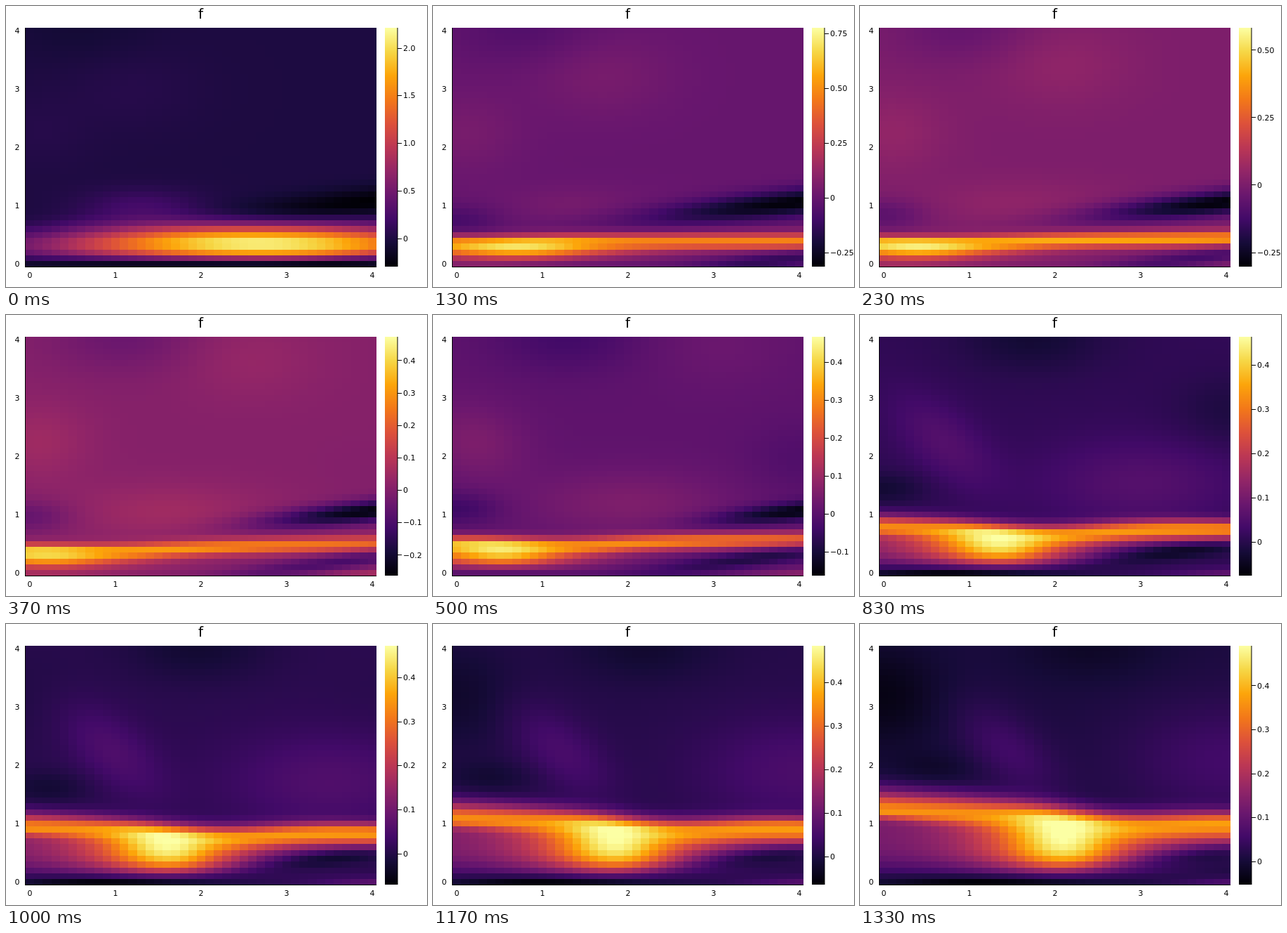
An HTML page with a canvas that plays this animation: 600 px wide and 400 px high, repeating every 1360 ms.

```html
<!DOCTYPE html>
<html lang="en">
<head>
<meta charset="utf-8">
<title>f</title>
<style>
html, body { margin: 0; width: 100%; height: 100%; overflow: hidden; background: #fff; }
canvas { display: block; }
</style>
</head>
<body>
<canvas id="plot" width="600" height="400"></canvas>
<script>
const ctx = document.getElementById('plot').getContext('2d');
const LOOP = 1360, N = 41;
const LEFT = 28, WIDTH = 500, BOTTOM = 371.5, HEIGHT = 340.5;
const BAR = { x: 540, y: 31, w: 18, h: 340 };

// Key points in time for the colour limits and the jet
const steps = [0, 4, 11, 18, 25, 35, 40];
const keys = {
  low: [-.293, -.314, -.263, -.1007, -.0754, -.0646, -.052],
  high: [2.214, .776, .4736, .465, .4634, .4849, .491],
  crestX: [2.7, .7, .25, .85, 1.35, 1.85, 2.1],
  base: [.1, .5, .36, .33, .32, .34, .35],
  crest: [2.1, .27, .11, .14, .14, .14, .14],
  floor: [-.15, .09, .06, -.045, -.07, -.065, -.055]
};

const palette = ['000004', '160b39', '420a68', '6a176e', '932667', 'bc3754',
  'dd513a', 'f37819', 'fca50a', 'f6d746', 'fcffa4']
  .map(hex => [0, 2, 4].map(i => parseInt(hex.slice(i, i + 2), 16)));

function colour(t) {
  const s = Math.min(1, Math.max(0, t)) * 10;
  const i = Math.min(9, Math.floor(s));
  const rgb = palette[i].map((c, n) => Math.round(c + (palette[i + 1][n] - c) * (s - i)));
  return `rgb(${rgb})`;
}

// Monotone cubic through the key points
function ease(ys, s) {
  const last = steps.length - 2;
  let i = 0;
  while (i < last && s >= steps[i + 1]) i++;
  const rise = n => (ys[n + 1] - ys[n]) / (steps[n + 1] - steps[n]);
  const slope = n => {
    if (n === 0) return rise(0);
    if (n > last) return rise(last);
    const a = rise(n - 1), b = rise(n);
    return a * b > 0 ? 2 * a * b / (a + b) : 0;
  };
  const h = steps[i + 1] - steps[i], u = (s - steps[i]) / h, v = 1 - u;
  return v * v * (1 + 2 * u) * ys[i] + u * u * (3 - 2 * u) * ys[i + 1]
    + h * u * v * (v * slope(i) - u * slope(i + 1));
}

const bell = (d, width) => Math.exp(-((d / width) ** 2));

function ramp(from, to, s) {
  const u = Math.min(1, Math.max(0, (s - from) / (to - from)));
  return u * u * (3 - 2 * u);
}

// Bright jet: a thin ridge with a filled crest travelling along it
function makeJet(s, key) {
  const burst = Math.exp(-s / 2);
  const growth = .00014 * s * s;
  const inletY = .37 + .029 * Math.max(0, s - 11);
  const outletY = .31 + .0175 * s;
  const dip = .05 + .09 * ramp(11, 25, s);
  const dipX = 1.3 + .06 * (s - 18);
  const wall = .16 + .004 * s;

  return x => {
    const dx = x - key.crestX;
    const ridge = inletY + (outletY - inletY) * x / 4 - dip * bell(x - dipX, 1);
    const strength = key.base + key.crest * bell(dx, .6 + 1.7 * burst)
      - .035 * x * bell(s - 12, 5);
    const spread = bell(dx, 1.1 + 3 * burst);
    const fill = dx < 0 ? .33 + .67 * spread : spread;
    const above = .12 + growth * (1 - .15 * x) + .22 * burst;
    const below = .12 + growth * x / 4 + .1 * burst;
    const floor = key.floor * bell(x - key.crestX / 2, .9 + burst)
      + .06 * ramp(4, 11, s) * bell(x - 4.2, .8);

    return y => {
      const shape = y > ridge ? bell(y - ridge, above)
        : fill + (1 - fill) * bell(ridge - y, below);
      const drag = 1 - Math.exp(-((y / wall) ** 1.7));
      return strength * shape * drag + floor * bell(y, .09);
    };
  };
}

// Soft patches drifting through the surroundings
function makePatches(s) {
  const late = Math.max(0, s - 11);
  return [
    { x: 4, y: 1.06, w: Math.max(.4, 1.9 - .06 * s), h: Math.max(.1, .25 - .006 * s),
      v: -.31 * Math.exp(-((s / 16.5) ** 4)), tilt: .15 },
    { x: 3.6, y: .45 * (1 - bell(s, 15)), w: 1.4, h: .16, v: -.16 * Math.exp(-s / 30), tilt: .2 },
    { x: .04 * Math.max(0, s - 25), y: .6 + .034 * s, w: .5, h: .28, v: -.1 * Math.exp(-s / 25) },
    { x: .1 + .05 * Math.max(0, s - 13), y: 2.25, w: .6, h: .65, v: .045, tilt: -.8 * ramp(11, 25, s) },
    { x: .6 + .045 * s, y: 4.05, w: .85, h: .6, v: -.06 * Math.exp(-s / 50) },
    { x: 4, y: 2.2 + .08 * (s - 18), w: .6, h: .6, v: -.045 * bell(s - 20, 6) },
    { x: Math.min(4, 1.6 + .1 * late), y: 1.05 + .035 * late, w: 1.2, h: .3 + .018 * s,
      v: .047 * ramp(0, 11, s) },
    { x: 1.2 + .125 * s, y: 3 + .06 * s, w: .8, h: .7, v: .05 * bell(s, 15) },
    { x: 0, y: 3.2, w: .7, h: .9, v: -.045 * ramp(25, 40, s) },
    { x: 1.3, y: 1, w: .7, h: .3, v: .2 * Math.exp(-s / 2) }
  ];
}

function drawField(s, key) {
  const jet = makeJet(s, key);
  const patches = makePatches(s);
  const background = .01 * Math.min(1, s / 18);
  const edgeX = i => Math.round(LEFT + i * WIDTH / N);
  const edgeY = j => Math.round(BOTTOM - j * HEIGHT / N);

  for (let i = 0; i < N; i++) {
    const x = i / 10, column = jet(x);
    for (let j = 0; j < N; j++) {
      const y = j / 10;
      let value = background + column(y);
      for (const p of patches) {
        const dx = x - p.x;
        value += p.v * bell(dx, p.w) * bell(y - p.y - (p.tilt || 0) * dx, p.h);
      }
      ctx.fillStyle = colour((value - key.low) / (key.high - key.low));
      ctx.fillRect(edgeX(i), edgeY(j + 1), edgeX(i + 1) - edgeX(i), edgeY(j) - edgeY(j + 1));
    }
  }
}

function label(text, x, y, align, size = 11) {
  ctx.font = `${size}px "DejaVu Sans", sans-serif`;
  ctx.textAlign = align;
  ctx.fillStyle = '#000';
  ctx.fillText(text, x, y);
}

function drawAxes() {
  ctx.fillStyle = '#000';
  ctx.fillRect(27, 31, 1, 341);
  ctx.fillRect(27, 371, 501, 1);
  label('f', 277.5, 18, 'center', 20);
  for (let n = 0; n <= 4; n++) {
    const middle = (n * 10 + .5) / N;
    label(n, LEFT + middle * WIDTH, 386.5, 'center');
    label(n, 19.5, BOTTOM - middle * HEIGHT + 4, 'right');
  }
}

function drawBar({ low, high }) {
  for (let i = 0; i < BAR.h; i++) {
    ctx.fillStyle = colour(1 - (i + .5) / BAR.h);
    ctx.fillRect(BAR.x, BAR.y + i, BAR.w, 1);
  }
  ctx.fillStyle = '#000';
  ctx.fillRect(557.5, BAR.y, 1, BAR.h);

  const range = high - low;
  const gap = range > 1.65 ? .5 : range > .75 ? .25 : .1;
  for (let n = Math.ceil(low / gap); n * gap <= high; n++) {
    const y = BAR.y + (high - n * gap) / range * BAR.h;
    const digits = Math.abs(n * gap).toFixed(gap === .25 ? 2 : 1);
    ctx.fillRect(558, Math.floor(y), 6, 1);
    label(n ? (n < 0 ? '\u2212' : '') + digits : '0', 566, y + 3.6, 'left');
  }
}

function draw(s) {
  const key = {};
  for (const name in keys) key[name] = ease(keys[name], s);
  ctx.fillStyle = '#fff';
  ctx.fillRect(0, 0, 600, 400);
  drawField(s, key);
  drawAxes();
  drawBar(key);
}

let shown = -1;
function tick() {
  const ms = performance.now() % LOOP;
  const step = Math.floor((Math.floor(ms / 10) + .5) * .3);
  if (step !== shown) draw(shown = step);
  requestAnimationFrame(tick);
}
tick();
</script>
</body>
</html>
```
